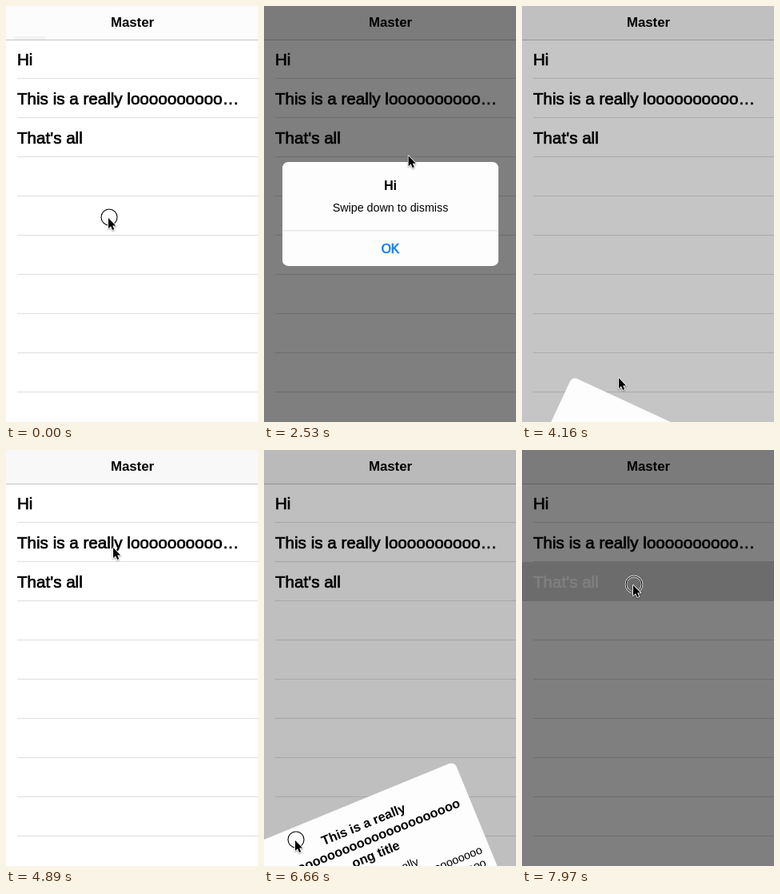
An HTML page with a canvas that plays this animation: 315 px wide and 520 px high, repeating every 8000 ms.

```html
<!DOCTYPE html>
<html>
<head>
<meta charset="utf-8">
<style>
html, body { margin: 0; height: 100%; overflow: hidden; background: #fff }
canvas { display: block }
</style>
</head>
<body>
<canvas id="stage" width="315" height="520"></canvas>
<script>
const ctx = document.getElementById('stage').getContext('2d');
const LOOP = 8000, TICK = 147.5; // the screen refreshes once per tick
const SANS = '"Liberation Sans", Arial, sans-serif';
const rows = ['Hi', 'This is a really loooooooooo…', "That's all"];
const o = n => 'o'.repeat(n);

// Times are in ticks: each alert drops in at start and is pulled away at drag.
const alerts = [
  {
    start: 11.53, drag: 21, pull: 34, twist: .078,
    title: ['Hi'],
    message: ['Swipe down to dismiss']
  },
  {
    start: 34.2, drag: 42, pull: 82, twist: -.077,
    title: ['This is a really', 'l' + o(24), 'ong title'],
    message: ['This is a really', 'l' + o(31), o(31), o(26) + 'ng', 'message']
  },
  { start: 53.9, drag: 60, pull: 0, twist: 0, title: [rows[2]], message: [''] }
];
const RELEASED = 300, DISMISSED = 350; // drag distances

// tick, x, y
const pointerStops = [
  [0, 127, 264], [6, 165, 74], [12, 166, 72], [19, 185, 232], [23, 150, 341], [28, 120, 464],
  [33, 133, 121], [37, 133, 121], [42, 70, 155], [45, 38, 487], [54, 138, 168]
];
const arrow = new Path2D('M0 0V15L3.5 11.8L6 17.3L8.4 16.3L6 11H10.6Z');
const ring = new Path2D();
ring.arc(2, 0, 10, 0, 7);

const clamp = v => Math.max(0, Math.min(1, v));
const dragged = (a, t) => a.pull * Math.max(0, t - a.drag) ** 1.15;

function pointerAt(t) {
  const i = Math.max(1, pointerStops.findIndex(stop => stop[0] >= t));
  const [t0, x0, y0] = pointerStops[i - 1], [t1, x1, y1] = pointerStops[i];
  const f = (t - t0) / (t1 - t0);
  return [x0 + (x1 - x0) * f, y0 + (y1 - y0) * f];
}

function rect(x, y, w, h, color) {
  ctx.fillStyle = color;
  ctx.fillRect(x, y, w, h);
}

function text(str, x, y, font, { color = '#000', align = 'center', weight = 0 } = {}) {
  ctx.font = `${font} ${SANS}`;
  ctx.fillStyle = ctx.strokeStyle = color;
  ctx.textAlign = align;
  ctx.fillText(str, x, y);
  if (weight) {
    ctx.lineWidth = weight;
    ctx.strokeText(str, x, y);
  }
}

function drawTable(t) {
  rect(0, 0, 315, 520, '#fff');
  rect(0, 0, 315, 42, t < 11 ? '#fcfcfc' : '#f8f8f8');
  if (t < 11) rect(10, 38, 40, 4, '#f3f3f3');
  text('Master', 158, 26, 'bold 16.8px');
  for (let i = 0; i < 9; i++) rect(14, 90 + 49 * i, 301, 1, '#dedede');
  rows.forEach((label, i) => {
    const { start } = alerts[i];
    const glow = t > start ? clamp(start + 2.5 - t) : 0;
    if (glow) rect(0, 42 + 49 * i, 315, 49, `rgba(217,217,217,${glow})`);
    const color = glow > .5 ? '#fff' : '#000';
    text(label, 14, 73.5 + 49 * i, '20.6px', { color, align: 'left', weight: .7 });
  });
  rect(0, 42, 315, 1, '#c4c4c4');
}

function drawAlert(alert, t) {
  const { start, twist, title, message } = alert;
  const pulled = dragged(alert, t);
  rect(0, 0, 315, 520, `rgba(0,0,0,${.5 * (1 - pulled / 585)})`);

  // critically damped drop from above
  const s = 20 * (t - start) * TICK / 1000;
  const left = (1 + s) * Math.exp(-s);
  const angle = twist * pulled + 52 * left;

  const height = 93 + 20.2 * title.length + 16.6 * message.length;
  const top = -height / 2, bottom = height / 2;
  ctx.save();
  ctx.translate(158, 260 + pulled - 520 * left);
  ctx.rotate(angle * Math.PI / 180);
  ctx.beginPath();
  ctx.roundRect(-135, top, 270, height, 7);
  ctx.fillStyle = '#fdfdfd';
  ctx.fill();
  title.forEach((line, i) => text(line, 0, top + 35 + 20.2 * i, 'bold 16.25px'));
  const first = top + 42 + 20.2 * title.length;
  message.forEach((line, i) => text(line, 0, first + 16.6 * i, '14.3px'));
  rect(-135, bottom - 44.5, 270, 1, '#dcdcdc');
  text('OK', 0, bottom - 16, '15.6px', { color: '#157efb', weight: .7 });
  ctx.restore();
}

function drawPointer(t) {
  const pressed = t === 0 || alerts.some(a => {
    const pulled = dragged(a, t);
    return t > a.start && t < a.start + 1 || pulled > 0 && pulled < RELEASED;
  });
  const outline = (path, width, color) => {
    ctx.lineWidth = width;
    ctx.strokeStyle = color;
    ctx.stroke(path);
  };
  ctx.save();
  ctx.translate(...pointerAt(t));
  if (pressed) {
    outline(ring, 2.4, '#fff');
    outline(ring, 1.1, '#000');
  }
  ctx.translate(1, 1);
  ctx.scale(.86, .86);
  ctx.lineJoin = 'round';
  ctx.shadowColor = 'rgba(0,0,0,.4)';
  ctx.shadowBlur = 2;
  ctx.shadowOffsetY = 1;
  outline(arrow, 2, '#fff');
  ctx.shadowColor = 'transparent';
  ctx.fillStyle = '#000';
  ctx.fill(arrow);
  ctx.restore();
}

function frame() {
  const t = Math.floor(performance.now() % LOOP / TICK);
  drawTable(t);
  const alert = alerts.find(a => t > a.start && dragged(a, t) < DISMISSED);
  if (alert) drawAlert(alert, t);
  drawPointer(t);
  requestAnimationFrame(frame);
}
frame();
</script>
</body>
</html>
```
